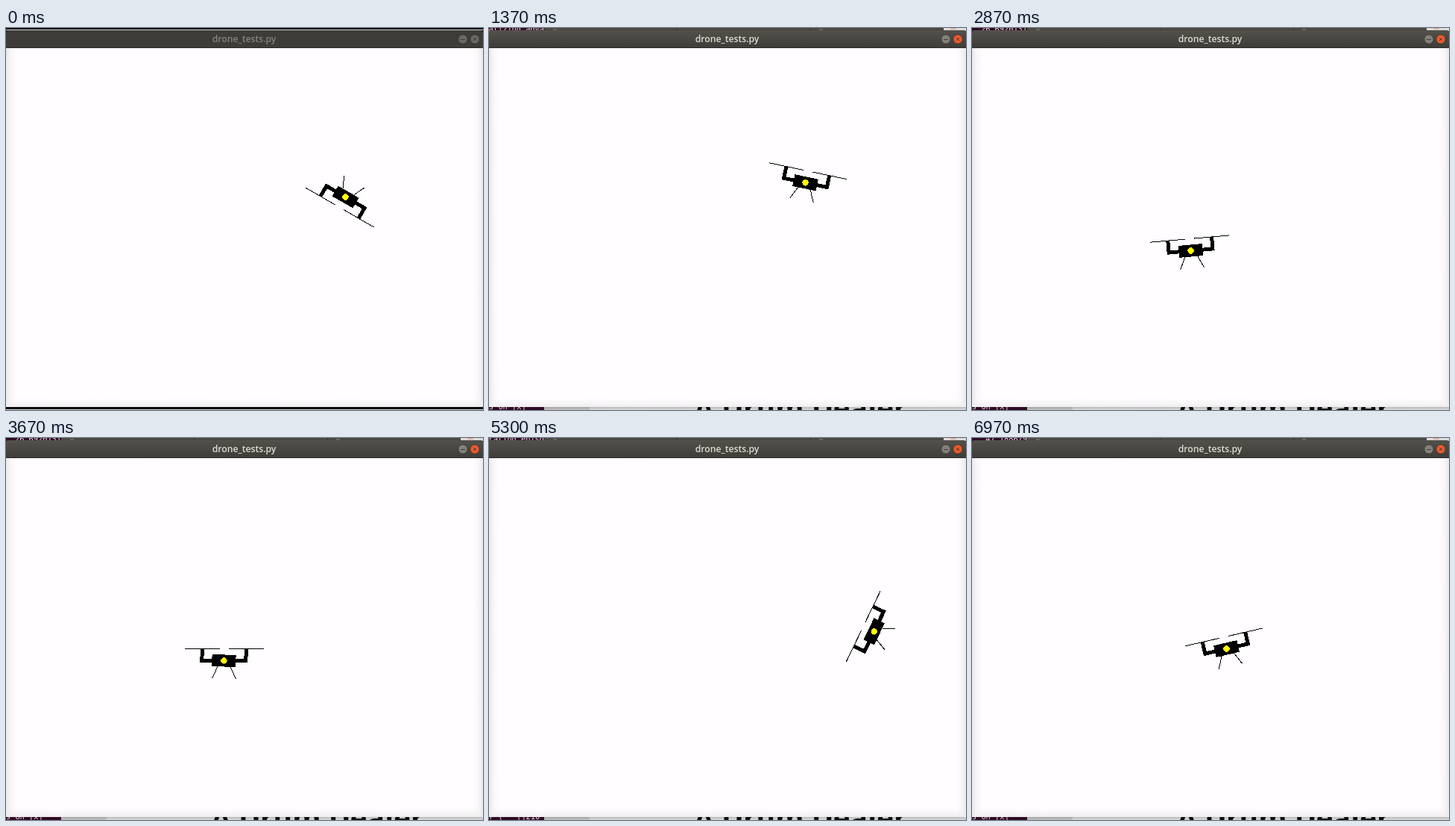
Write an HTML page that moves like this. It is 640 px wide and 512 px high and loops after 7.01 s.

```html
<!DOCTYPE html>
<html lang="en">
<head>
<meta charset="utf-8">
<title>drone_tests.py</title>
<style>
  html, body { margin: 0; width: 100%; height: 100%; overflow: hidden; background: #fff; }
  svg { display: block; width: 640px; height: 512px; }
  .mono { font: 10.3px "DejaVu Sans Mono", "Noto Sans Mono", monospace; fill: #e4dde2; }
  .head { font: 700 39px "Noto Sans", "Open Sans", sans-serif; fill: #111; }
  .name { font: 600 12.2px "Open Sans", "Noto Sans", sans-serif; fill: #dfdbd2; text-anchor: middle; }
  .idle .name { fill: #86837c; }
  .idle .bar { fill: #3d3c38; }
  .idle .btn { fill: #6b6963; }
  .idle #desk { display: none; }
  .btn { fill: #84817a; stroke: #383631; stroke-width: .6; }
  .close { fill: #ee5a2c; }
  .mark { stroke: #403e39; fill: none; }
</style>
</head>
<body>
<svg id="stage" viewBox="0 0 640 512" class="idle">
  <defs>
    <linearGradient id="barFill" x2="0" y2="1">
      <stop stop-color="#53514b"/><stop offset="1" stop-color="#3d3c38"/>
    </linearGradient>
    <linearGradient id="edge">
      <stop stop-color="#e9e8e9"/><stop offset=".45" stop-color="#f8f7f8"/>
      <stop offset="1" stop-color="#fffdff"/>
    </linearGradient>
    <linearGradient id="foot" x2="0" y2="1">
      <stop stop-color="#f2f0f2" stop-opacity="0"/><stop offset="1" stop-color="#efeeef"/>
    </linearGradient>
    <linearGradient id="shade" x2="0" y2="1">
      <stop stop-color="#000" stop-opacity=".28"/><stop offset="1" stop-color="#000" stop-opacity=".1"/>
    </linearGradient>
    <clipPath id="term"><path d="M0 0h74v512H0z"/></clipPath>
    <clipPath id="view"><path d="M0 27h640v480H0z"/></clipPath>
  </defs>

  <path d="M0 0h640v512H0z"/>
  <path d="M0 2h640v1H0zM0 511h640v1H0z" fill="#d8d8d6"/>

  <g id="desk">
    <path d="M0 0h640v4H0z" fill="#4a4843"/>
    <path d="M610 0h30v4h-30z" fill="#dedcda"/>
    <path d="M252.500 0v3M431.500 0v3" stroke="#353430"/>
    <path d="M86 2h5M443 2h5" stroke="#8a8780"/>
    <path d="M619 1h8" stroke="#d98a72"/>
    <path d="M0 507h640v5H0z" fill="#f4f4f4"/>
    <path d="M74 507h61v5H74z" fill="#d9d9d8"/>
    <text class="head" x="275" y="524">A Drum Dealer</text>
    <path d="M0 507h640v5H0z" fill="url(#shade)"/>
    <path d="M0 0h74v4H0zM0 507h74v5H0z" fill="#300a24"/>
    <g class="mono" clip-path="url(#term)">
      <text id="top" x="74" y="5" text-anchor="end"></text>
      <text id="low" y="511"></text>
    </g>
  </g>

  <path class="bar" d="M0 27V6q0-3 3-3h634q3 0 3 3v21z" fill="url(#barFill)"/>
  <path d="M0 26h640v1H0z" fill="#2f2e2a"/>
  <text class="name" x="319.500" y="19">drone_tests.py</text>
  <circle class="btn" cx="613" cy="15" r="6"/>
  <circle class="btn close" cx="629" cy="15" r="6"/>
  <path class="mark" d="M610 15.500h6M627 13l4 4M631 13l-4 4"/>

  <path d="M0 27h640v481H0z" fill="#fffdff"/>
  <path d="M0 27h14v481H0z" fill="url(#edge)"/>
  <path d="M0 27h14v481H0z" fill="url(#edge)" transform="matrix(-1 0 0 1 640 0)"/>
  <path d="M0 496h640v12H0z" fill="url(#foot)"/>

  <g clip-path="url(#view)" shape-rendering="crispEdges">
    <g id="drone">
      <path d="M-16-8h32V8h-32z"/>
      <path d="M-29.500-15.500V0h59v-15.500" fill="none" stroke="#000" stroke-width="5"/>
      <path d="M-53-16h47M6-16h47M-8.500 8L-16 24M8.500 8L16 24" stroke="#000"/>
      <circle r="4.200" fill="#ff0"/>
    </g>
  </g>
</svg>
<script>
const LOOP = 7010;
const $ = id => document.getElementById(id);
const place = (t, x, y, angle) => ({ t, x, y, angle });

// Each flight drops the drone somewhere and steers it towards the middle.
const flight = (from, to, log, prompt = "s on [x]") => ({ from, to, log, prompt });
const flights = [
  flight(place(0, 455, 226, 210), place(800, 341, 261, 35), "5.0046494"),
  flight(place(1000, 583, 180, 0), place(2000, 340, 221, 30.5), "alizing adva"),
  flight(place(2340, 569, 205, 0), place(2870, 293, 298, -5), "26.6920131"),
  flight(place(3700, 84, 205, 0), place(4470, 309, 291, 35), "26.6920131"),
  flight(place(5270, 520, 258.5, -65.5), place(5970, 340, 275, 12), "rating episo", "r ( ~ []210"),
  flight(place(6400, 578, 215, 0), place(6970, 341, 282, -13), "47.188679")
];

const mix = (a, b, u) => a + (b - a) * u;

// Quick approach with a lean into the turn, then a fading sway.
function pose({ from, to }, t) {
  const u = Math.min((t - from.t) / (to.t - from.t), 1);
  const v = 1 - (1 - u) ** 2;
  const s = v * v * (3 - 2 * v);
  const lean = 30 * Math.sign(to.x - from.x) * u * Math.sin(2 * Math.PI * u);
  const rest = Math.max(t - to.t, 0) / 200;
  const fade = Math.exp(-rest / 2);
  return {
    x: mix(from.x, to.x, s) + 10 * fade * Math.sin(rest),
    y: mix(from.y, to.y, s),
    angle: (mix(from.angle, to.angle, s) + lean) * fade * Math.cos(rest)
  };
}

function draw(t) {
  const now = flights.findLast(f => f.from.t <= t);
  const { x, y, angle } = pose(now, t);
  $("drone").setAttribute("transform", `translate(${x + .5} ${y + .5}) rotate(${angle})`);
  $("stage").classList.toggle("idle", t < 100);
  $("top").textContent = now.log;
  $("low").textContent = now.prompt;
}

const begin = performance.now();
function tick() {
  draw((performance.now() - begin) % LOOP);
  requestAnimationFrame(tick);
}
tick();
</script>
</body>
</html>
```
